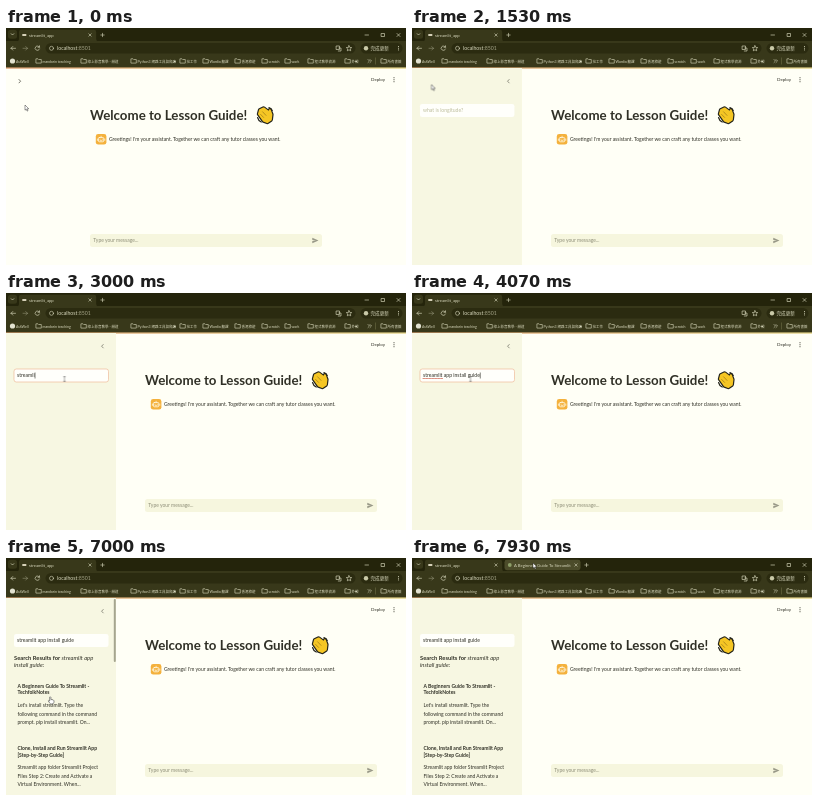
Recreate the animation shown at these times as an HTML page. Size 400 by 237 pixels, loop 8000 ms.

```html
<!DOCTYPE html>
<html lang="en">
<head>
<meta charset="utf-8">
<title>Assistant demo</title>
<style>
  html, body { margin: 0; width: 100%; height: 100%; overflow: hidden; background: #fffff6; }
  svg { display: block; width: 100vw; height: 100vh; }
  text { font: 5px Lato, "Noto Sans CJK TC", "Noto Sans CJK", sans-serif; fill: #303026; white-space: pre; }
  .chrome text { font-size: 4.2px; fill: #d8d8bd; }
  .line { fill: none; stroke-linecap: round; stroke-linejoin: round; }
  .dim { fill: #8e8e78; }
  .bold { font-weight: 700; }

  .main, .sidebar, .pointer { animation: 8s linear infinite; }
  .main { animation-name: main; }
  .sidebar { animation-name: sidebar; }
  .pointer { animation-name: travel; }
  .flag { visibility: hidden; animation: 8s step-end infinite; }
  .hover { animation-name: hover; }
  .closed { animation-name: closed; }
  .focus { animation-name: focus; }
  .results { animation-name: results; }
  .inside { animation-name: inside; }
  .scrollable { animation-name: scrollable; }
  .new-tab { animation-name: new-tab; }
  .one-tab { animation-name: one-tab; }
  .arrow { animation-name: arrow; }
  .hand { animation-name: hand; }
  .beam { animation-name: beam; }

  @keyframes main {
    0%, 15.5% { transform: none; animation-timing-function: ease-out; }
    19.2%, 100% { transform: translateX(55px); }
  }
  @keyframes sidebar {
    0%, 15.5% { transform: translateX(-111px); animation-timing-function: ease-out; }
    19.2%, 100% { transform: none; }
  }
  @keyframes travel {
    0%, 1% { transform: translate(19px, 77px); animation-timing-function: ease-in-out; }
    10%, 17.5% { transform: translate(13.5px, 51.5px); animation-timing-function: ease-in-out; }
    24%, 27% { transform: translate(59px, 90px); animation-timing-function: ease-in-out; }
    30%, 76% { transform: translate(58.5px, 86px); animation-timing-function: ease-in-out; }
    83%, 89.5% { transform: translate(44px, 139px); animation-timing-function: ease-in-out; }
    98%, 100% { transform: translate(121px, 5px); }
  }
  @keyframes hover { 10% { visibility: visible; } 15.5%, 100% { visibility: hidden; } }
  @keyframes closed { 0% { visibility: visible; } 15.5%, 100% { visibility: hidden; } }
  @keyframes focus { 29% { visibility: visible; } 86%, 100% { visibility: hidden; } }
  @keyframes results { 66.5%, 100% { visibility: visible; } }
  @keyframes inside { 15.5% { visibility: visible; } 95%, 100% { visibility: hidden; } }
  @keyframes scrollable { 66.5% { visibility: visible; } 95%, 100% { visibility: hidden; } }
  @keyframes new-tab { 88.2%, 100% { visibility: visible; } }
  @keyframes one-tab { 0% { visibility: visible; } 88.2%, 100% { visibility: hidden; } }
  @keyframes arrow {
    0%, 18.5%, 77%, 91%, 100% { visibility: visible; }
    10%, 22.5%, 82% { visibility: hidden; }
  }
  @keyframes hand {
    10%, 82% { visibility: visible; }
    18.5%, 91%, 100% { visibility: hidden; }
  }
  @keyframes beam { 22.5% { visibility: visible; } 77%, 100% { visibility: hidden; } }
</style>
</head>
<body>
<svg viewBox="0 0 400 237" preserveAspectRatio="none">
  <defs>
    <linearGradient id="strip">
      <stop stop-color="#d07a3e"/><stop offset="1" stop-color="#d9c25a"/>
    </linearGradient>
    <path id="folder" class="line" d="M.3 .8h1.7l.7.7h2.6v3.6h-5z" stroke="#d8d8bd" stroke-width=".6"/>
    <path id="plus" class="line" d="M-1.7 0h3.4M0-1.7v3.4" stroke="#d8d8bd" stroke-width=".6"/>
    <path id="close" class="line" d="M-1.2-1.2l2.4 2.4m0-2.4l-2.4 2.4" stroke="#d8d8bd" stroke-width=".6"/>
    <path id="palm" d="M3.4 8.2L4.4 4.4 8 2.6l4 3 1.4 1.2.8-2.4 1.6 4.4-.6 5-3.4 2.4-3.6-1.4z"/>
  </defs>

  <rect width="400" height="237" fill="#fffff6"/>
  <rect y="39.3" width="400" height="1.2" fill="url(#strip)"/>

  <g class="main">
    <text class="bold" x="84" y="92" style="font-size:13.3px">Welcome to Lesson Guide!</text>
    <g transform="translate(249.6 77.8)" class="line">
      <use href="#palm" stroke="#24241b" stroke-width="4.4"/>
      <use href="#palm" fill="#f5c624" stroke="#f5c624" stroke-width="2"/>
      <path d="M5 8.6l3 3M7 6l3.4 3.6" stroke="#8a6a18" stroke-width=".6"/>
      <path d="M2 11.8q.8 3.2 3.6 4.4M13.4 1.8q2.4.6 3.2 2.8" stroke="#24241b" stroke-width="1.3"/>
    </g>
    <rect x="89.8" y="106" width="10.6" height="10.6" rx="2.4" fill="#f4b13c"/>
    <g class="line" stroke="#fffbe8" stroke-width=".75">
      <rect x="92.5" y="109.5" width="5.2" height="4.3" rx=".8"/>
      <path d="M95.1 109.4v-1.2M91.4 111v1.4M98.8 111v1.4M94 111.2h.1M96.2 111.2h.1M94.1 112.7h2"/>
    </g>
    <text x="103" y="113.1">Greetings! I'm your assistant. Together we can craft any tutor classes you want.</text>
    <rect x="84" y="206" width="232" height="13" rx="2.5" fill="#f6f6de"/>
    <text class="dim" x="87.3" y="214.3">Type your message...</text>
    <path d="M306.3 209.8l6.2 2.7-6.2 2.7v-2.1l3.7-.6-3.7-.6z" fill="#989887"/>
  </g>

  <text x="365" y="53.3" style="font-size:4.5px">Deploy</text>
  <path class="line" d="M388 49.7v.1m0 1.9v.1m0 1.9v.1" stroke="#303026" stroke-width="1"/>
  <rect class="flag hover" x="9" y="48" width="10" height="10" rx="1.8" fill="#dfe6c5"/>
  <path class="line flag closed" d="M13 51.5l1.6 1.7-1.6 1.7" stroke="#55554a" stroke-width=".8"/>

  <g class="sidebar">
    <rect y="40" width="110" height="197" fill="#f7f7e2"/>
    <path class="line flag inside" d="M97.2 51.5l-1.6 1.7 1.6 1.7" stroke="#66665a" stroke-width=".7"/>
    <rect x="8" y="76" width="94.5" height="13" rx="2.3" fill="#fffffb"/>
    <g class="flag focus">
      <rect x="8" y="76" width="94.5" height="13" rx="2.3" fill="none" stroke="#ecb08c" stroke-width=".6"/>
    </g>
    <text id="query" x="11" y="84.1" style="font-size:5.1px"></text>
    <g class="flag focus">
      <path id="squiggle" class="line" d="M11 85.5h19.6" stroke="#c8503c" stroke-width=".65" stroke-dasharray=".7 .8"/>
      <path id="caret" d="M0 79.5v6" stroke="#303026" stroke-width=".6"/>
    </g>
    <g class="flag results">
      <text class="bold" x="8" y="102.2" style="font-size:5.8px">Search Results for <tspan font-style="italic" font-weight="400">streamlit app</tspan></text>
      <text x="8" y="109.2" style="font-size:5.8px"><tspan font-style="italic">install guide</tspan>:</text>
      <text class="bold" x="11.5" y="130">A Beginners Guide To Streamlit -</text>
      <text class="bold" x="11.5" y="136.4">TechfolkNotes</text>
      <text x="11.5" y="149">Let's install streamlit. Type the</text>
      <text x="11.5" y="157.5">following command in the command</text>
      <text x="11.5" y="166">prompt. pip install streamlit. On...</text>
      <text class="bold" x="11.5" y="192.3">Clone, Install and Run Streamlit App</text>
      <text class="bold" x="11.5" y="199">[Step-by-Step Guide]</text>
      <text x="11.5" y="211">Streamlit app folder Streamlit Project</text>
      <text x="11.5" y="219.5">Files Step 2: Create and Activate a</text>
      <text x="11.5" y="228">Virtual Environment. When...</text>
    </g>
    <rect class="flag scrollable" x="107.8" y="41" width="2" height="63" rx="1" fill="#a5a58f"/>
  </g>

  <g class="chrome">
    <rect width="400" height="14" fill="#24240b"/>
    <rect y="13" width="400" height="26.4" fill="#38381a"/>
    <rect x="2" y="1.8" width="9" height="9" rx="2.5" fill="#38381a"/>
    <path class="line" d="M5.2 5.7l1.3 1.3 1.3-1.3" stroke="#d8d8bd" stroke-width=".7"/>
    <path d="M11 13.2q2 0 2-2V4q0-2.2 2.2-2.2H88q2.2 0 2.2 2.2v7.2q0 2 2 2z" fill="#38381a"/>
    <rect x="16.3" y="6" width="4" height="2" fill="#d5d0b8"/>
    <text x="23" y="8.6">streamlit_app</text>
    <use href="#close" x="84" y="7"/>
    <use class="flag one-tab" href="#plus" x="96.5" y="7"/>
    <g class="flag new-tab">
      <rect x="92.5" y="1.8" width="76" height="10.4" rx="2.4" fill="#4c4c2a"/>
      <circle cx="97.8" cy="7" r="1.9" fill="#8fa06a"/>
      <text x="102" y="8.6">A Beginners Guide To Streamlit</text>
      <use href="#close" x="164" y="7"/>
      <use href="#plus" x="174.5" y="7"/>
    </g>
    <g class="line" stroke="#d8d8bd" stroke-width=".65">
      <path d="M359 7h3.5M391 5.5l3 3m0-3l-3 3"/>
      <rect x="375.5" y="5.5" width="3" height="3"/>
      <path d="M9.5 20.3H5m1.8-1.8L5 20.3l1.8 1.8"/>
      <path d="M17 20.3h4.5m-1.8-1.8l1.8 1.8-1.8 1.8" opacity=".5"/>
      <path d="M33.3 19a2.2 2.2 0 1 0 .2 2M33.5 17.8v1.5H32"/>
    </g>
    <rect x="39.5" y="15" width="310" height="10.6" rx="5.3" fill="#2b2b10"/>
    <circle cx="45.5" cy="20.3" r="2" class="line" stroke="#d8d8bd" stroke-width=".6"/>
    <text x="51" y="22.1" style="font-size:5.2px">localhost<tspan fill="#a5a588">:8501</tspan></text>
    <g class="line" stroke="#d8d8bd" stroke-width=".65">
      <rect x="330.5" y="18" width="3" height="3.5"/>
      <path d="M332.8 20h2.2v3h-2.7M343 17.7l.8 1.7 1.9.2-1.4 1.3.4 1.9-1.7-1-1.7 1 .4-1.9-1.4-1.3 1.9-.2z"/>
    </g>
    <rect x="354.5" y="15" width="42" height="10.6" rx="5.3" fill="#2b2b10"/>
    <circle cx="360" cy="20.3" r="2.2" fill="#c9c9a8"/>
    <text x="364.5" y="22" style="font-size:4.6px">完成更新</text>
    <path class="line" d="M392.5 18.5v.1m0 1.6v.1m0 1.6v.1" stroke="#d8d8bd" stroke-width=".9"/>
    <circle cx="6.5" cy="33" r="2.6" fill="#e2e2d0"/>
    <g id="bookmarks"></g>
    <path class="line" d="M362 31.5l1.5 1.5-1.5 1.5m2-3l1.5 1.5-1.5 1.5" stroke="#d8d8bd" stroke-width=".6"/>
    <path d="M369.5 29.5v7" stroke="#77774d" stroke-width=".5"/>
  </g>

  <g class="pointer">
    <path class="flag arrow" d="M0 0v5.2l1.2-1.1.9 2 .9-.4-.9-1.9h1.7z" fill="#fff" stroke="#222" stroke-width=".45"/>
    <path class="flag hand" d="M-.3.1q.8-.7 1.2.2v2.2q2.9 0 3.1 1.3v1.4Q3.8 7 1.6 7 .3 7-.5 5.8l-1.3-1.9q.5-.9 1.5.1z" fill="#fff" stroke="#222" stroke-width=".5"/>
    <path class="flag beam line" d="M-.8-2.3h1.6M0-2.3v4.6M-.8 2.3h1.6" stroke="#555" stroke-width=".5"/>
  </g>
</svg>
<script>
  const phrase = "streamlit app install guide";
  const placeholder = "what is longitude?";
  const typing = { start: 2500, end: 4020 };
  const query = document.getElementById("query");
  const caret = document.getElementById("caret");
  const squiggle = document.getElementById("squiggle");

  const bookmarks = [
    [10, "AskWell"], [30, "mandarin teaching"], [75, "線上影音教學 - 頻道"],
    [125, "Python3 網路工具與爬蟲"], [174, "找工作"], [197, "Wordia 翻譯"],
    [229, "香港旅遊"], [256, "scratch"], [279, "work"],
    [302, "程式教學資源"], [339, "外觀"], [375, "所有書籤"]
  ];
  document.getElementById("bookmarks").innerHTML = bookmarks.map(([x, label], i) =>
    (i ? `<use href="#folder" x="${x}" y="30"/>` : "") +
    `<text x="${x + (i ? 6.5 : 0)}" y="34.5" style="font-size:3.5px">${label}</text>`
  ).join("");

  let shown = -1;
  function draw() {
    const time = performance.now() % 8000;
    const progress = (time - typing.start) / (typing.end - typing.start);
    const count = Math.floor(Math.min(1, Math.max(0, progress)) * phrase.length);
    if (count !== shown) {
      shown = count;
      query.textContent = count ? phrase.slice(0, count) : placeholder;
      query.style.fill = count ? "" : "#bdbd9c";
      const width = count ? query.getComputedTextLength() : 0;
      caret.setAttribute("transform", `translate(${11.4 + width} 0)`);
      squiggle.style.opacity = count > 9 ? 1 : 0;
    }
    const blinking = time > typing.end + 300;
    caret.style.opacity = blinking && time % 1000 >= 500 ? 0 : 1;
    requestAnimationFrame(draw);
  }
  draw();
</script>
</body>
</html>
```
